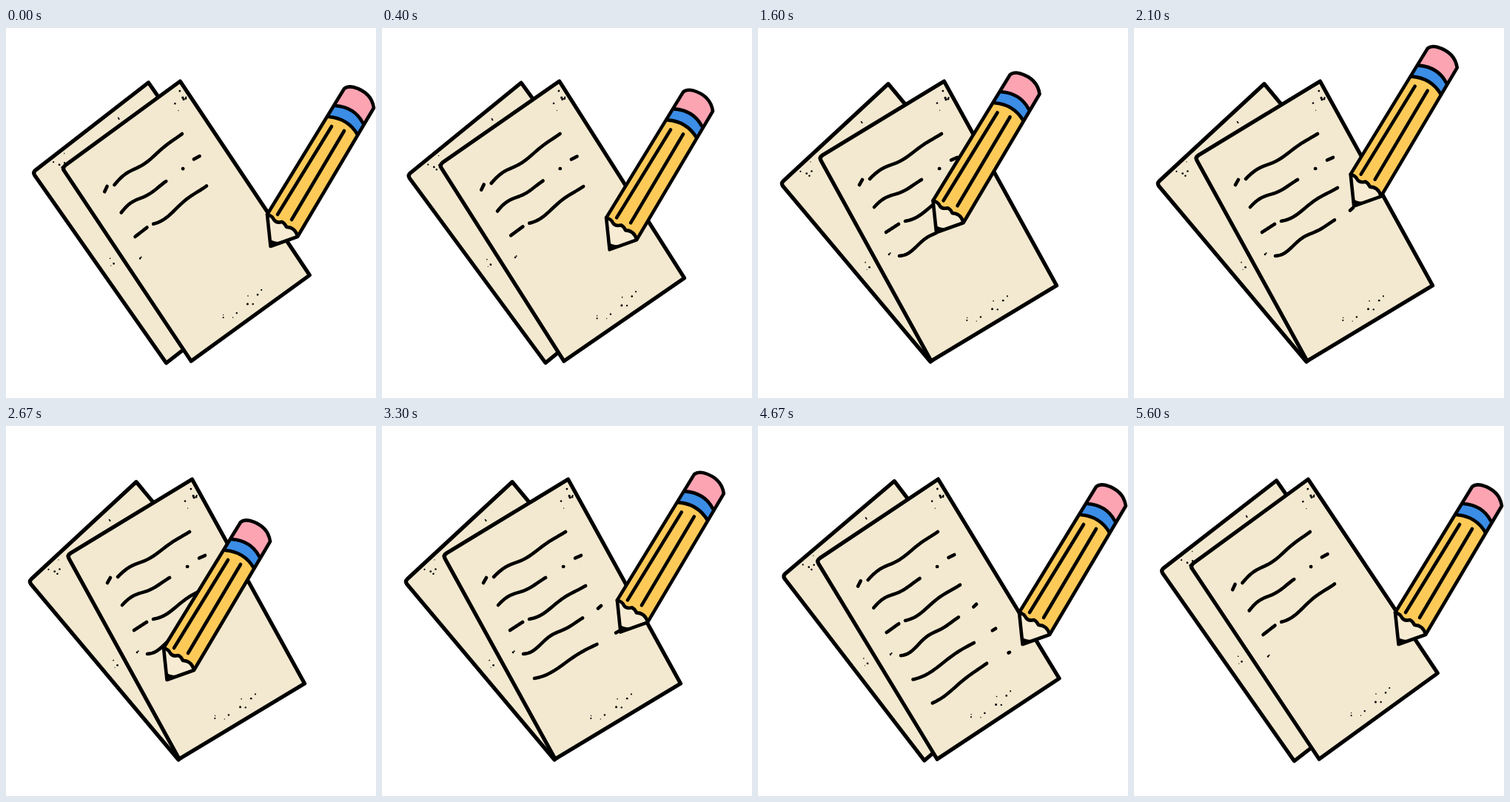
Recreate the animation shown at these times as an HTML page. Size 500 px wide and 500 px high, loop 5730 ms.

```html
<!DOCTYPE html>
<html lang="en">
<head>
<meta charset="utf-8">
<title>Writing pencil</title>
<style>
html, body { margin: 0; width: 100%; height: 100%; overflow: hidden; background: #fff; }
svg { display: block; width: 100%; height: 100%; }
.ink, .paper { stroke: #000; stroke-linecap: round; stroke-linejoin: round; }
.ink { fill: none; stroke-width: 4.6; }
.paper { fill: #f3e9d0; stroke-width: 5.2; }
</style>
</head>
<body>
<svg viewBox="0 0 500 500">
  <g id="back">
    <path class="paper" d="M176 75.5 L377 317 L233 451 L33.5 213.5 Q31 210 34 207 Z"/>
  </g>
  <g id="front">
    <path class="paper" d="M251.5 72 L403.5 348 L234 450 L85 179 Q82.5 175 87 172 Z"/>
  </g>
  <g id="pencil">
    <path fill="#fdca58" d="M353 252 L436 120 Q462 122 475 144 L394 281 Z"/>
    <path fill="#3b8de6" d="M436 120 L445 105 Q471 107 482 130 L475 144 Q462 122 436 120 Z"/>
    <path fill="#fda4b3" d="M445 105 L457 82 Q462 78 470 80 Q494 87 497 108 L482 130 Q471 107 445 105 Z"/>
    <path fill="#f7ecd3" d="M353 252 L357.5 295 L394 281 Q390 271 381 271 Q376 263 366 263 Q361 255 353 252 Z"/>
    <path d="M355 284 Q360 289 370 289 L357.5 296 Z"/>
    <path class="ink" d="M353 252 L457 82 Q462 78 470 80 Q494 87 497 108 L394 282 L357.5 295 Z"/>
    <path class="ink" d="M436 120 Q462 122 475 144 M445 105 Q471 107 482 128"/>
    <path class="ink" d="M353 252 Q360 254 362 259 Q365 264 373 262 Q377 264 379 269 Q390 269 394 281"/>
    <path class="ink" d="M367 252 L440 133 M386 259 L457 139"/>
  </g>
</svg>
<script>
const LOOP = 5730, STEP = 79.8;
const REST = [357, 296];
const [front, back, pencil] = ['front', 'back', 'pencil'].map(id => document.getElementById(id));
const clamp = x => Math.max(0, Math.min(1, x));
const ramp = (t, a, b) => clamp((t - a) / (b - a));
const smooth = x => x * x * (3 - 2 * x);
const mix = (a, b, u) => a.map((v, i) => v + (b[i] - v) * u);

let seed = 11;
const random = () => (seed = seed * 16807 % 2147483647) / 2147483647;

function add(parent, tag, attrs) {
  const el = document.createElementNS('http://www.w3.org/2000/svg', tag);
  for (const k in attrs) el.setAttribute(k, attrs[k]);
  return parent.appendChild(el);
}

// Specks scattered in an ellipse that leans with the paper's short edge
function specks(parent, x, y, rx, ry, count) {
  for (let i = 0; i < count; i++) {
    const a = random() * 6.283, d = Math.sqrt(random());
    const u = Math.cos(a) * d * rx, v = Math.sin(a) * d * ry;
    add(parent, 'circle', { cx: x + u, cy: y + v - u * .5, r: .6 + random() * 1.1 });
  }
}

specks(back, 137, 128, 4, 7, 2);
specks(back, 67, 190, 14, 13, 5);
specks(back, 149, 317, 6, 10, 3);
specks(front, 246, 100, 13, 14, 8);
specks(front, 177, 306, 2, 3, 2);
specks(front, 310, 382, 30, 14, 9);

// Handwritten stroke: a straight run with a wobble that fades out
function wave([x0, y0, x1, y1, amp = 0, freq = 1]) {
  const points = [];
  for (let i = 0; i <= 24; i++) {
    const [x, y] = mix([x0, y0], [x1, y1], i / 24), u = i / 24;
    points.push([x, y + amp * (1 - u) * Math.sin(2 * Math.PI * freq * u)]);
  }
  return 'M' + points.join(' L');
}

[
  [137, 212, 141, 205],
  [151, 204, 248, 143, -4, 1.5],
  [157, 242, 221, 205, -5],
  [245, 190, 245.3, 190],
  [261, 178.5, 269, 175],
  [173, 276, 190, 265],
  [199, 261, 275, 216, 5]
].forEach(s => add(front, 'path', { class: 'ink', d: wave(s) }));

// Lines being written: main stroke, short dash, where the tip lifts, times
const lines = [
  { main: [191, 308, 271, 259.5, 4.5, 1.5], dash: [292, 246.5, 296, 243], end: [298, 240], write: [1000, 2030] },
  { main: [206, 341, 290.5, 295, 6, .8], dash: [316, 279.5, 320.5, 277], end: [327, 274], write: [2740, 3220] },
  { main: [231, 374, 306.5, 323.5, 3], dash: [336.5, 310.5, 338, 310], end: [341, 308], write: [3610, 4180] }
];

lines.forEach((l, i) => {
  l.el = add(front, 'path', { class: 'ink' });
  l.start = l.main.slice(0, 2);
  l.erase = [4720 + 280 * i, 5030 + 280 * i];
  let d = wave(l.main);
  const lengths = ['', l.dash.slice(0, 2), l.dash.slice(2), l.end].map(p => {
    if (p) d += ' L' + p;
    l.el.setAttribute('d', d);
    return l.el.getTotalLength();
  });
  l.parts = [[0, lengths[0]], [lengths[1], lengths[2]]];
  l.len = lengths[3];
});

const written = (l, t) => Math.pow(ramp(t, ...l.write), 1.5) * l.len;

// Show only the inked parts between the eraser and the pencil
function drawLine(l, t) {
  const from = ramp(t, ...l.erase) * l.len, to = written(l, t);
  const shown = l.parts
    .map(([a, b]) => [Math.max(a, from), Math.min(b, to)])
    .filter(([a, b]) => b - a > .1);
  l.el.setAttribute('visibility', shown.length ? 'visible' : 'hidden');
  if (!shown.length) return;
  const cuts = shown.flat();
  const dashes = cuts.slice(1).map((c, i) => c - cuts[i]);
  l.el.setAttribute('stroke-dashoffset', -cuts[0]);
  l.el.setAttribute('stroke-dasharray', [...dashes, 999].join(' '));
}

// Tip travel between the lines
const [A, B, C] = lines;
const nearA = [186, 311], nearB = [217, 344];
const moves = [
  [33, 890, REST, nearA],
  [900, 1000, nearA, A.start],
  [2050, 2650, A.end, nearB],
  [2660, 2740, nearB, B.start],
  [3240, 3610, B.end, C.start],
  [4180, 4480, C.end, REST]
];

function tipAt(t) {
  const l = lines.find(({ write: [a, b] }) => t >= a && t < b);
  if (l) {
    const p = l.el.getPointAtLength(written(l, t));
    return [p.x, p.y];
  }
  const move = moves.filter(m => t >= m[0]).pop();
  if (!move) return REST;
  const [a, b, p, q] = move;
  return mix(p, q, smooth(ramp(t, a, b)));
}

// Poses are held on a steady beat
const hold = t => Math.max(0, 100 + STEP * Math.floor((t - 82) / STEP));

function draw(time) {
  const t = hold(time % LOOP);
  const turn = 1 - smooth(ramp(t, 67, 867)) + smooth(ramp(t, 4250, 5050));
  front.setAttribute('transform', `rotate(${-4.9 * turn} 243.5 261)`);
  back.setAttribute('transform', `rotate(${5 * turn} 204.5 263.7)`);
  lines.forEach(l => drawLine(l, t));
  const [x, y] = tipAt(t);
  pencil.setAttribute('transform', `translate(${x - REST[0]} ${y - REST[1]})`);
}

const begin = performance.now();
function tick() {
  draw(performance.now() - begin);
  requestAnimationFrame(tick);
}
tick();
</script>
</body>
</html>
```
